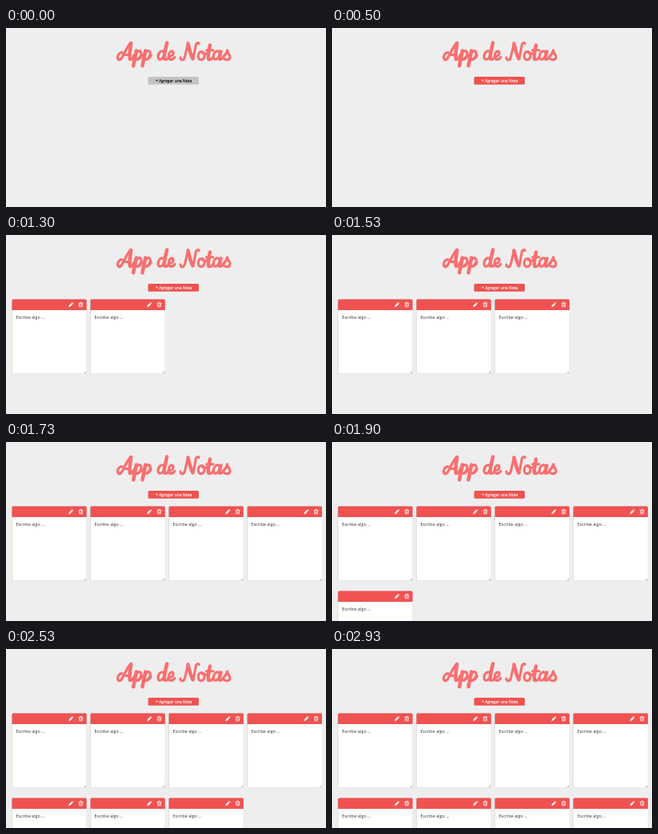
An HTML page that plays this animation: 400 by 224 pixels, repeating every 3360 ms.

```html
<!DOCTYPE html>
<html lang="es">
<head>
<meta charset="utf-8">
<title>App de Notas</title>
<style>
html, body { margin: 0; width: 100%; height: 100%; overflow: hidden; background: #eeeeee; }
svg { display: block; width: 400px; height: 224px; font-family: "Open Sans", "Noto Sans", sans-serif; }
.title { fill: none; stroke: #f96f70; stroke-width: 3.1; stroke-linecap: round; stroke-linejoin: round; }
.stem { stroke-width: 4.5; }
.label { font-size: 5px; stroke-width: .12; }
.hint { font-size: 5.45px; fill: #333; }
.icon { fill: none; stroke: #fff; stroke-width: .75; stroke-linejoin: round; }
.icon .solid { fill: #fff; stroke-width: .3; }
.grip { stroke: #777; stroke-width: .5; }
.card { filter: drop-shadow(0 .6px .7px rgba(0, 0, 0, .4)); }

.btn, .label, .note { animation: 3360ms step-end infinite; }
.btn { animation-name: press; }
.label { animation-name: ink; }
@keyframes press { 0% { fill: #c2c4c4; } 14.88%, to { fill: #ef5350; } }
@keyframes ink { 0% { fill: #000; stroke: #000; } 14.88%, to { fill: #fff; stroke: #fff; } }

/* each note pops in on its own click */
@keyframes n0 { 0% { visibility: hidden; } 27.678%, to { visibility: visible; } }
@keyframes n1 { 0% { visibility: hidden; } 38.69%, to { visibility: visible; } }
@keyframes n2 { 0% { visibility: hidden; } 45.535%, to { visibility: visible; } }
@keyframes n3 { 0% { visibility: hidden; } 51.487%, to { visibility: visible; } }
@keyframes n4 { 0% { visibility: hidden; } 56.547%, to { visibility: visible; } }
@keyframes n5 { 0% { visibility: hidden; } 67.261%, to { visibility: visible; } }
@keyframes n6 { 0% { visibility: hidden; } 75.297%, to { visibility: visible; } }
@keyframes n7 { 0% { visibility: hidden; } 87.201%, to { visibility: visible; } }
</style>
</head>
<body>
<svg viewBox="0 0 400 224">
  <defs>
    <g id="note">
      <g class="card">
        <rect width="93.3" height="93.2" rx="1.6" fill="#fffffe"/>
        <path d="M0 13.4V1.6Q0 0 1.6 0H91.7Q93.3 0 93.3 1.6V13.4Z" fill="#f05252"/>
      </g>
      <g class="icon">
        <path class="solid" d="M71 9.4L71.5 7.5L74 5L75.4 6.4L72.9 8.9ZM74.5 4.5L75.2 3.8L76.6 5.2L75.9 5.9Z"/>
        <path d="M83.2 4.9H88.8M85 4.7V3.9H87V4.7M83.9 5.2L84.2 9.3H87.8L88.1 5.2M85.4 6.2V8.2M86.6 6.2V8.2"/>
      </g>
      <text class="hint" x="5" y="24.2">Escribe algo ...</text>
      <path class="grip" d="M90.2 92.6L92.6 90.2M91.5 92.6L92.6 91.5"/>
    </g>
    <g id="p">
      <path class="stem" d="M163 28.5L159.2 47.3"/>
      <path d="M161.3 34.5C163 29 167 27.2 168.6 29.8C170 33 167 40 162.5 39.5C166 40 169 37 170 34"/>
    </g>
  </defs>

  <g class="title" role="img" aria-label="App de Notas">
    <path d="M145 30.5C140 31 138 37.5 141 39.8C146 41 149 25 156 18.5M146.5 33.5H155M155 39C157 40.5 159 37.5 160 34"/>
    <path class="stem" d="M156.3 19C155.5 26 153.5 34 155 39"/>
    <use href="#p"/>
    <use href="#p" x="11.3"/>
    <path d="M198 30C194 26.5 190 31.5 190 36C190.5 41.5 195.5 39.5 197.5 34.5M198 38.5C200 41 202.5 38 203.5 36"/>
    <path class="stem" d="M201.2 18.5C199.5 26 197 34 198 38.5"/>
    <path d="M204 35.5C208 35.5 210 32.5 209 30C207 27.5 203.2 30.5 203.2 35C203.2 41 208 40.5 211 36.5"/>
    <path d="M218 37C217.8 40.5 222 41.5 223.5 36.5L227.5 19M234 38.5L237 23C237.6 18.5 240 17.5 241.2 19.5"/>
    <path class="stem" d="M227.5 19.5C229 26 231 34 233.5 38.5"/>
    <path d="M244.5 29.5C239 29.5 239 40 243.8 39.7C249.5 39 249.5 29.5 244.5 29.5C245.5 32.5 249 33.5 251 31.5"/>
    <path class="stem" d="M255 21.5C253.8 28 251.8 35 253.3 38.8"/>
    <path d="M253.3 39.3C256 41 258.5 37.5 259.5 35M250.5 27.8H259"/>
    <path d="M267 30C263 26.5 259.2 31.5 259.2 36C259.7 41.5 264.7 39.5 266.7 34.5M267.3 38.8C269.5 40.5 272 36.5 273 34"/>
    <path class="stem" d="M268.5 29.5C267 34 266.5 36.5 267.3 38.8"/>
    <path d="M271.5 36.5C274 34 276 31 276.6 27.8C277 31.5 280.7 34 280 37C279 40.5 275 40.2 273 38.8"/>
  </g>

  <rect class="btn" x="177.6" y="61" width="63.4" height="9.8" rx="1.5"/>
  <text class="label" x="187" y="67.6">+ Agregar una Nota</text>
  <g id="notes"></g>
</svg>
<script>
const notes = document.getElementById('notes');
for (let i = 0; i < 8; i++) {
  const use = document.createElementNS('http://www.w3.org/2000/svg', 'use');
  use.setAttribute('href', '#note');
  use.setAttribute('class', 'note');
  use.setAttribute('x', 7.5 + 98.05 * (i % 4));
  use.setAttribute('y', i < 4 ? 80.5 : 186.5);
  use.style.animationName = 'n' + i;
  notes.append(use);
}
</script>
</body>
</html>
```
